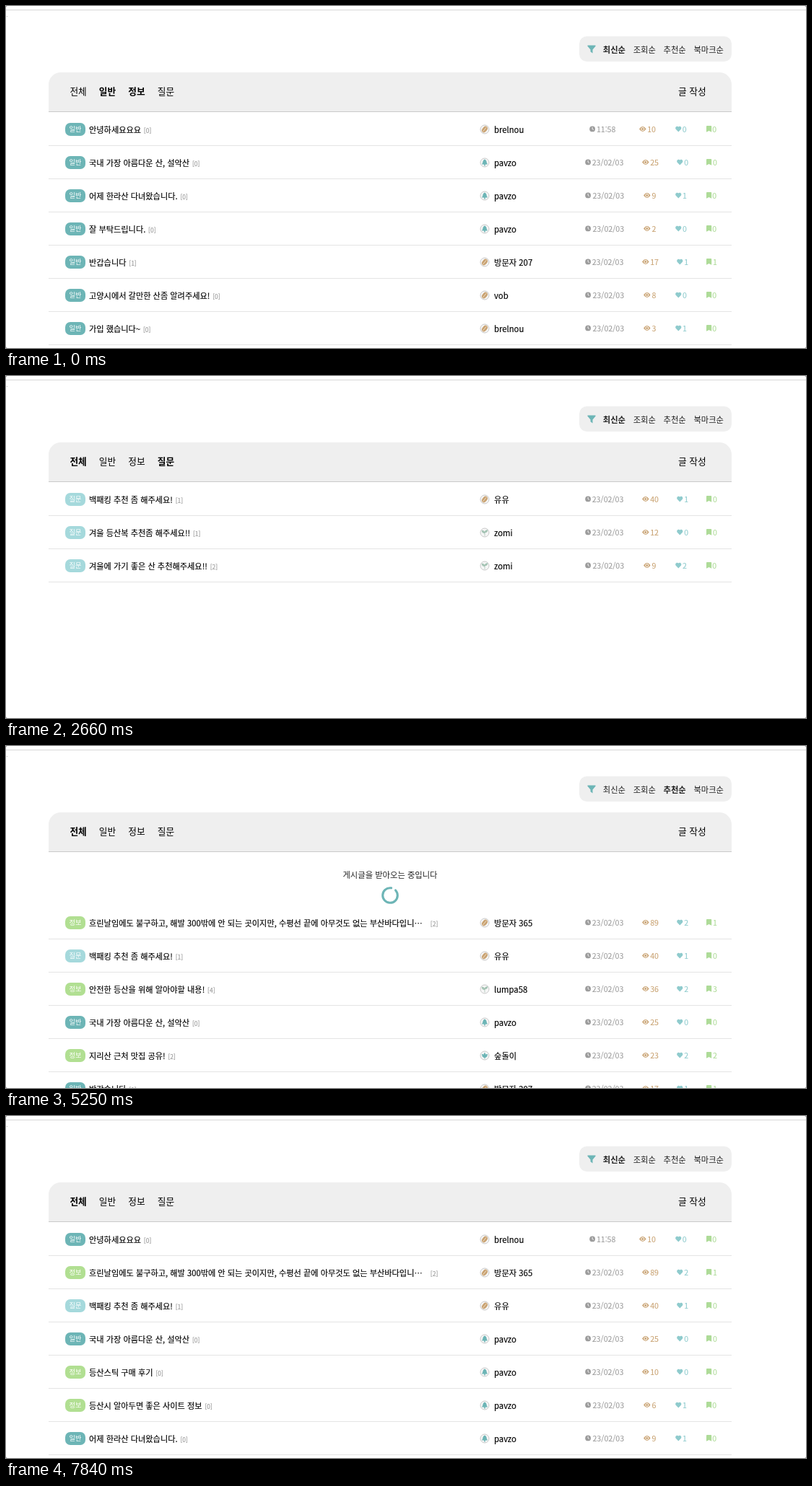
These frames come from a looping animation (1108 px wide and 474 px high, 8000 ms). An HTML page:

```html
<!DOCTYPE html>
<html lang="ko">
<head>
<meta charset="utf-8">
<title>게시판</title>
<style>
  :root { --teal: #6db5b6; --green: #b1df92; --aqua: #a5d9dc; --brown: #c9a373; }
  html, body { margin: 0; width: 100%; height: 100%; overflow: hidden; background: #888; }
  #stage {
    position: absolute; left: 0; top: 0; width: 1108px; height: 474px; overflow: hidden;
    background: #fff; border-radius: 2px; color: #000;
    font: 400 11.3px/16px 'Noto Sans CJK KR', 'Noto Sans KR', 'Noto Sans CJK', sans-serif;
    white-space: pre;
  }
  #stage div, .spinner { position: absolute; }
  svg { display: block; flex: none; overflow: visible; }
  .edge { left: 0; top: 5px; width: 1108px; height: 1px; background: #d6d6d6; }
  .speck { left: 1px; top: 14px; width: 1px; height: 1px; background: #bbb; }

  .sorts {
    left: 794px; top: 42px; width: 211px; height: 34.5px; box-sizing: border-box;
    padding: .8px 0 0 32.8px; border-radius: 10.5px; background: #efefef; color: #222;
    display: flex; align-items: center; gap: 10.7px;
  }
  .sorts svg { position: absolute; left: 10.5px; top: 12.3px; }
  .tabs {
    left: 59px; top: 91.5px; width: 946px; height: 55.5px; box-sizing: border-box;
    padding: 0 0 .8px 29.4px; border-radius: 17px 17px 0 0; background: #efefef;
    border-bottom: 1px solid #cacaca; font-size: 12.7px; font-weight: 500;
    display: flex; align-items: center; gap: 17.1px;
  }
  .tabs .write { position: absolute; left: 872px; font-weight: 400; }
  .tabs .on, .sorts .on { font-weight: 700; }

  .list { left: 59px; top: 148px; width: 946px; }
  .row { left: 0; width: 946px; height: 45px; border-bottom: 1px solid #e4e4e4; }
  .badge {
    left: 23px; top: 14px; width: 28px; height: 18px; border-radius: 7px;
    font-size: 9.2px; line-height: 17px; font-weight: 500; text-align: center; color: #fff;
  }
  .title, .user { top: 14.5px; font-weight: 500; -webkit-text-stroke: .15px; }
  .title { left: 56px; font-size: 11.2px; display: flex; align-items: baseline; }
  .title .long { width: 469px; }
  .title small { margin-left: 3.8px; font-size: 8.5px; font-weight: 400; color: #9a9a9a; }
  .avatar { left: 597px; top: 16px; }
  .user { left: 617px; }
  .stats {
    left: 730px; top: 0; width: 208.5px; height: 45px; font-size: 10.6px;
    display: flex; justify-content: space-around; align-items: center;
    -webkit-text-stroke: .1px;
  }
  .stats span { display: flex; align-items: center; }
  .date { min-width: 47.3px; justify-content: center; color: #9c9c9c; }
  .views { color: var(--brown); }
  .likes { color: #8fcbcd; }
  .marks { color: #aedb98; }

  .loading { left: 0; top: 148px; width: 1064px; text-align: center; color: #222; }
  .loading p { margin: 21.5px 0 0; }
  .spinner { left: 520px; top: 47.2px; }
</style>
</head>
<body>
<div id="stage"></div>
<script>
const LOOP = 8000;
const ROW = 46;
const LOADING_SHIFT = 74;
const TABS = ['전체', '일반', '정보', '질문'];
const SORTS = ['최신순', '조회순', '추천순', '북마크순'];
const BADGES = { 일반: 'var(--teal)', 정보: 'var(--green)', 질문: 'var(--aqua)' };

const svg = (box, width, height, body, attrs = '') =>
  `<svg viewBox="${box}" width="${width}" height="${height}" fill="currentColor" ${attrs}>${body}</svg>`;
const statIcon = (slot, body) => svg(`0 0 ${slot} 9`, slot, 9, body);

const ICONS = {
  date: statIcon(10.1, '<circle cx="4.1" cy="4.4" r="3.9"/><path d="M4.1 2V4.5L5.8 5.6" fill="none" stroke="#fff" stroke-width=".9"/>'),
  views: statIcon(11.6, '<path d="M0 4.5Q4.8-2.4 9.6 4.5Q4.8 11.4 0 4.5"/><circle cx="4.8" cy="4.5" r="2" fill="none" stroke="#fff"/>'),
  likes: statIcon(9.9, '<path d="M4.3 8.5L.7 4.8C-1 2.5 2-.8 4.3 1.6C6.6-.8 9.6 2.5 7.9 4.8Z"/>'),
  marks: statIcon(8.6, '<path d="M.9 0H6.3Q7.2 0 7.2.9V8.8L3.6 6.9L0 8.8V.9Q0 0 .9 0"/>'),
  funnel: svg('0 0 12 12', 12, 12, '<path d="M.8.5H11.2Q12 1 11.5 1.8L7.5 6.5V11.5L4.5 9.3V6.5L.5 1.8Q0 1 .8.5"/>', 'style="color:var(--teal)"'),
  spinner: svg('-12 -12 24 24', 24, 24,
    '<circle r="10.3" fill="none" stroke="currentColor" stroke-width="3.1" pathLength="360" stroke-linecap="round" stroke-dasharray="322 38" transform="rotate(-43)"/>',
    'class="spinner" style="color:var(--teal)"'),
};

const AVATARS = {
  seed: '<g transform="rotate(40)" fill="var(--brown)"><ellipse rx="3.2" ry="4.8"/><path d="M0-4V4" stroke="#f3e6d4" stroke-width=".8"/></g>',
  tree: '<path d="M0-4.6Q2.6-3.6 2.8 0L4 2.6H-4L-2.8 0Q-2.6-3.6 0-4.6M-.8 2.6H.8V4.6H-.8Z" fill="var(--teal)"/>',
  sprout: '<path d="M0 4.5V0M0 .8Q-4 .8-4-3Q0-3 0 .8M0 0Q0-3.4 4-3.4Q4 0 0 0" fill="#a9c9b8" stroke="#9dbcae" stroke-width=".7"/>',
  leaf: '<path d="M0-4.5L1.5-1.6L4.2-2.2L3.2 1.4L1 3H.5V4.6H-.5V3H-1L-3.2 1.4L-4.2-2.2L-1.5-1.6Z" fill="var(--teal)"/>',
};

const USERS = {
  brelnou: 'seed', pavzo: 'tree', '방문자 207': 'seed', '방문자 365': 'seed', vob: 'seed',
  lumpa58: 'sprout', 숲돌이: 'leaf', zomi: 'sprout', tulv73: 'sprout', 유유: 'seed',
};

// kind, title, comments, user, views, likes, bookmarks, date
const POSTS = {
  hello: ['일반', '안녕하세요요요', 0, 'brelnou', 10, 0, 0, '11:58'],
  sea: ['정보', '흐린날임에도 불구하고, 해발 300밖에 안 되는 곳이지만, 수평선 끝에 아무것도 없는 부산바다입니⋯', 2, '방문자 365', 89, 2, 1],
  pack: ['질문', '백패킹 추천 좀 해주세요!', 1, '유유', 40, 1, 0],
  peak: ['일반', '국내 가장 아름다운 산, 설악산', 0, 'pavzo', 25, 0, 0],
  stick: ['정보', '등산스틱 구매 후기', 0, 'pavzo', 10, 0, 0],
  sites: ['정보', '등산시 알아두면 좋은 사이트 정보', 0, 'pavzo', 6, 1, 0],
  trip: ['일반', '어제 한라산 다녀왔습니다.', 0, 'pavzo', 9, 1, 0],
  please: ['일반', '잘 부탁드립니다.', 0, 'pavzo', 2, 0, 0],
  nice: ['일반', '반갑습니다', 1, '방문자 207', 17, 1, 1],
  nearby: ['일반', '고양시에서 갈만한 산좀 알려주세요!', 0, 'vob', 8, 0, 0],
  joined: ['일반', '가입 했습니다~', 0, 'brelnou', 3, 1, 0],
  safe: ['정보', '안전한 등산을 위해 알아야할 내용!', 4, 'lumpa58', 36, 2, 3],
  food: ['정보', '지리산 근처 맛집 공유!', 2, '숲돌이', 23, 2, 2],
  wear: ['질문', '겨울 등산복 추천좀 해주세요!!', 1, 'zomi', 12, 0, 0],
  winter: ['질문', '겨울에 가기 좋은 산 추천해주세요!!', 2, 'zomi', 9, 2, 0],
  greet: ['일반', '안녕하세요!', 1, 'tulv73', 11, 3, 1, '23/02/02'],
  intro: ['일반', '가입인사 드립닝다!!', 1, 'zomi', 7, 1, 1],
};

const LISTS = {
  general: 'hello peak trip please nice nearby joined',
  info: 'sea stick sites safe food',
  question: 'pack wear winter',
  all: 'hello sea pack peak stick sites trip',
  views: 'sea pack safe peak food nice wear',
  likes: 'greet sea food winter safe intro pack',
  marks: 'safe food intro sea nice greet nearby',
};

// start time, list, highlighted labels, loading
const STEPS = [
  [0, 'general', '일반 정보 최신순'],
  [490, 'info', '정보 최신순'],
  [840, 'info', '정보 질문 최신순'],
  [1540, 'info', '질문 최신순', true],
  [1610, 'question', '질문 최신순'],
  [1750, 'question', '정보 질문 최신순'],
  [1820, 'question', '일반 질문 최신순'],
  [2100, 'question', '질문 최신순'],
  [2660, 'question', '전체 질문 최신순'],
  [2870, 'question', '전체 최신순', true],
  [2940, 'all', '전체 최신순'],
  [3710, 'all', '전체 최신순 조회순'],
  [4200, 'views', '전체 조회순'],
  [4620, 'views', '전체 조회순 추천순'],
  [5250, 'views', '전체 추천순', true],
  [5390, 'likes', '전체 추천순'],
  [6020, 'likes', '전체 추천순 북마크순'],
  [6650, 'marks', '전체 북마크순'],
  [6930, 'marks', '전체 추천순 북마크순'],
  [7000, 'marks', '전체 북마크순'],
  [7070, 'marks', '전체 조회순 북마크순'],
  [7210, 'marks', '전체 최신순 북마크순'],
  [7770, 'marks', '전체 최신순', true],
  [7840, 'all', '전체 최신순'],
];

const stat = (name, value) => `<span class="${name}">${ICONS[name]}${value}</span>`;

function rowHtml(id, index) {
  const [kind, title, comments, user, views, likes, marks, date = '23/02/03'] = POSTS[id];
  const long = title.endsWith('⋯') ? 'long' : '';
  const avatar = svg('-7 -7 14 14', 14, 14,
    `<circle r="6" fill="#f6f6f6" stroke="#c9c9c9"/>${AVATARS[USERS[user]]}`);
  return `<div class="row" style="top:${index * ROW}px">
    <div class="badge" style="background:${BADGES[kind]}">${kind}</div>
    <div class="title"><span class="${long}">${title}</span><small>[${comments}]</small></div>
    <div class="avatar">${avatar}</div><div class="user">${user}</div>
    <div class="stats">${stat('date', date)}${stat('views', views)}${stat('likes', likes)}${stat('marks', marks)}</div>
  </div>`.replace(/>\s+</g, '><');
}

function render([, list, active, loading]) {
  const highlighted = active.split(' ');
  const labels = names => names
    .map(name => `<span class="${highlighted.includes(name) ? 'on' : ''}">${name}</span>`).join('');
  const rows = LISTS[list].split(' ').map(rowHtml).join('');
  const shift = loading ? LOADING_SHIFT : 0;
  stage.innerHTML = '<div class="edge"></div><div class="speck"></div>' +
    `<div class="sorts">${ICONS.funnel}${labels(SORTS)}</div>` +
    `<div class="tabs">${labels(TABS)}<span class="write">글 작성</span></div>` +
    (loading ? `<div class="loading"><p>게시글을 받아오는 중입니다</p>${ICONS.spinner}</div>` : '') +
    `<div class="list" style="transform:translateY(${shift}px)">${rows}</div>`;
}

const stage = document.getElementById('stage');
let shown;
function tick() {
  const time = performance.now() % LOOP;
  const step = STEPS.findLast(([start]) => start <= time);
  if (step !== shown) render(shown = step);
  requestAnimationFrame(tick);
}
tick();
</script>
</body>
</html>
```
